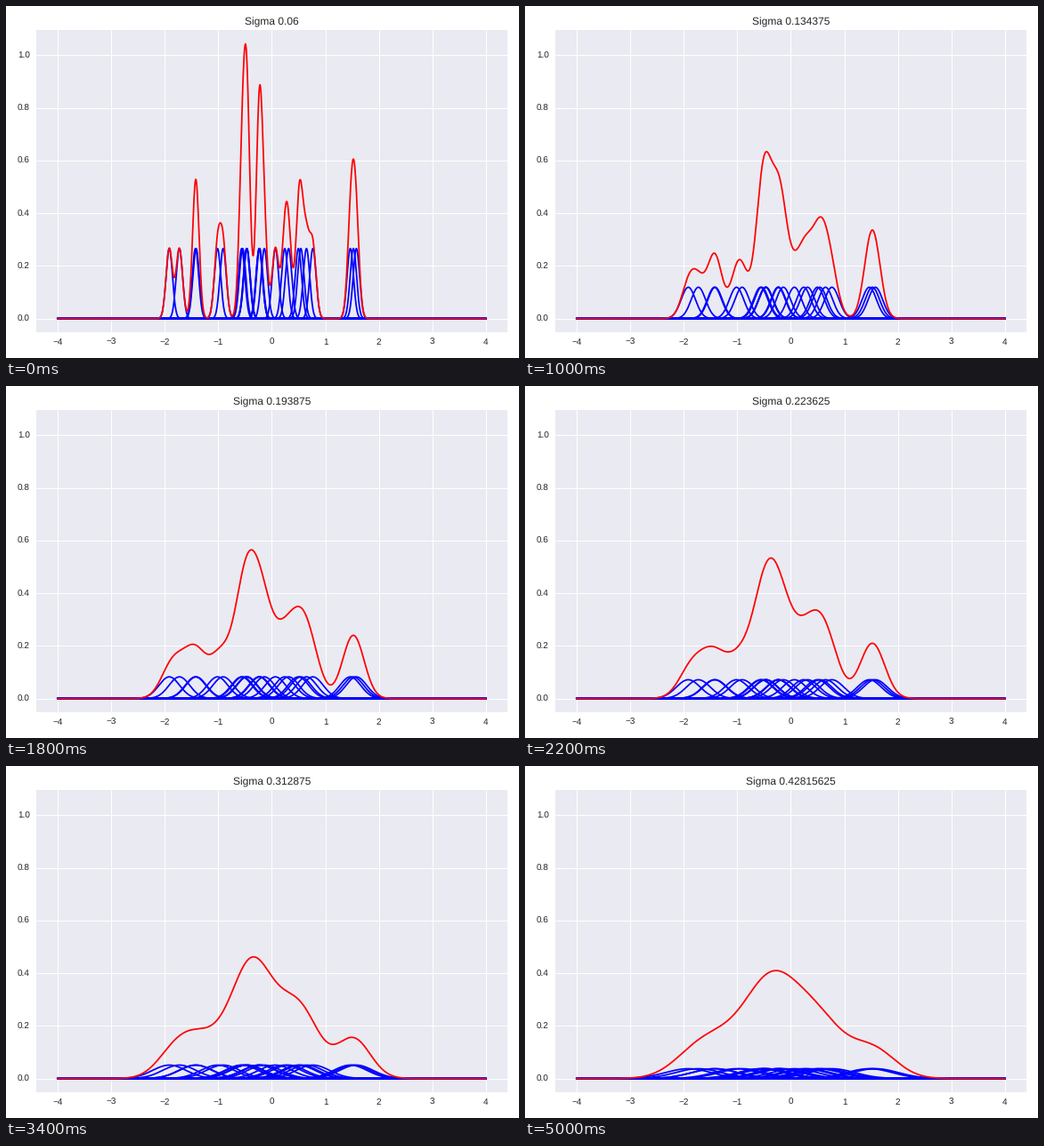
A matplotlib script for the animation above (5100 ms loop, 576 px wide and 396 px high).

```python
import numpy as np
import matplotlib.pyplot as plt
from matplotlib.animation import FuncAnimation

WIDTH, HEIGHT, DPI = 576, 396, 72
FRAMES, INTERVAL = 51, 100
SIGMA_START, SIGMA_RATE, LAST_TIME = 0.06, 0.074375, 4.95
INK = "0.15"

np.random.seed(42)
SAMPLES = np.random.randn(25)
GRID = np.linspace(-4, 4, 1000)

plt.rcParams.update({
    "font.family": "Liberation Sans",
    "text.color": INK,
    "text.hinting": "none",
    "lines.linewidth": 1.75,
    "lines.solid_capstyle": "round",
})


def kernels(sigma):
    """One weighted Gaussian per sample, as rows."""
    z = (GRID - SAMPLES[:, None]) / sigma
    scale = sigma * np.sqrt(2 * np.pi) * len(SAMPLES)
    return np.exp(-z**2 / 2) / scale


def sigma_at(frame):
    time = min(frame * INTERVAL / 1000, LAST_TIME)
    return SIGMA_START + SIGMA_RATE * time


fig = plt.figure(figsize=(WIDTH / DPI, HEIGHT / DPI), dpi=DPI, facecolor="white")
left, right, top, bottom = 33.77, 563.07, 27.15, 367.05
ax = fig.add_axes([left / WIDTH, 1 - bottom / HEIGHT,
                   (right - left) / WIDTH, (bottom - top) / HEIGHT])
ax.set_facecolor("#EAEAF2")
ax.set_axisbelow(True)
ax.grid(color="white", linewidth=1, linestyle="-")
ax.spines[:].set_visible(False)
ax.tick_params(length=0, pad=7, labelsize=10, labelcolor=INK)

# The narrowest kernels give the tallest curve, which fixes the view.
peak = kernels(SIGMA_START).sum(axis=0).max()
ax.set_xlim(-4.4, 4.4)
ax.set_ylim(-0.05 * peak, 1.05 * peak)
ax.set_xticks(range(-4, 5))
ax.set_yticks(np.arange(6) / 5)

title = ax.set_title("", fontsize=12, pad=6)
bumps = [ax.plot(GRID, 0 * GRID, color="blue")[0] for _ in SAMPLES]
total, = ax.plot(GRID, 0 * GRID, color="red")


def draw(frame):
    sigma = sigma_at(frame)
    curves = kernels(sigma)
    for line, curve in zip(bumps, curves):
        line.set_ydata(curve)
    total.set_ydata(curves.sum(axis=0))
    title.set_text(f"Sigma {sigma:.8g}")
    return [*bumps, total, title]


anim = FuncAnimation(fig, draw, frames=FRAMES, interval=INTERVAL,
                     repeat=True, repeat_delay=0, blit=False)
plt.show()
```
